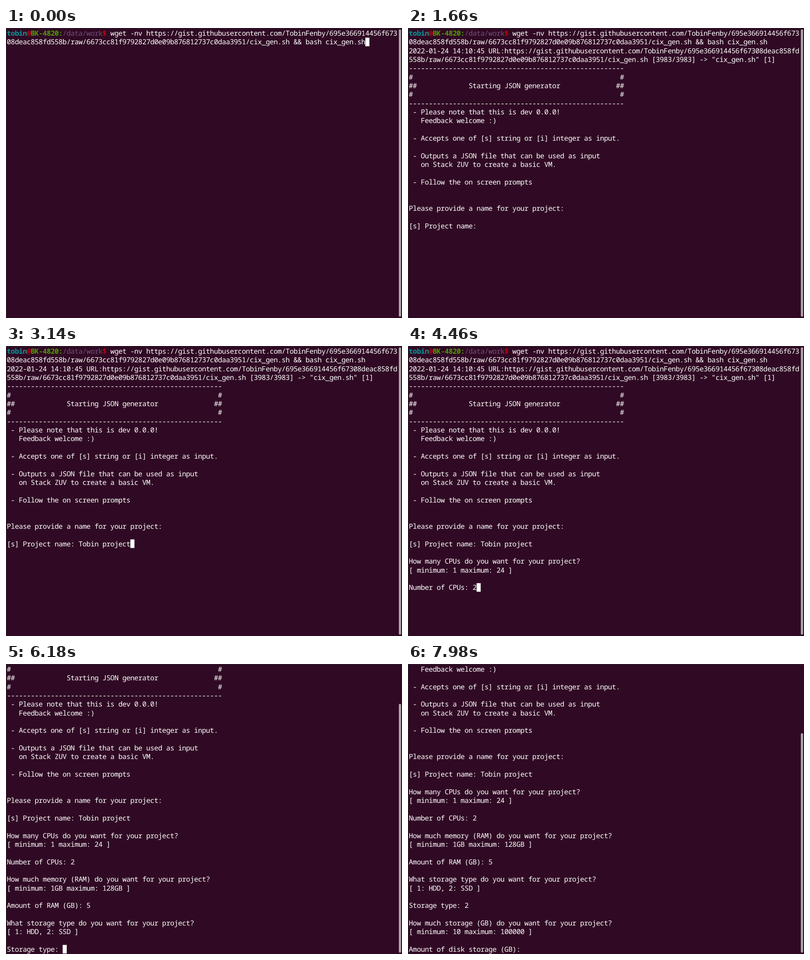
Animation, 874 px wide and 641 px high, one loop 8 s. Source, as an HTML page:

```html
<!DOCTYPE html>
<html lang="en">
<head>
<meta charset="utf-8">
<title>Terminal session</title>
<style>
  :root { --cell: 8.79px; --row: 19.34px; }
  html, body { margin: 0; width: 100%; height: 100%; overflow: hidden; background: #300a24; }
  #stage {
    position: absolute; left: 0; top: 0; width: 874px; height: 641px; overflow: hidden;
    background: #300a24; color: #fff;
    font: 15.5px/var(--row) "Noto Sans Mono", "DejaVu Sans Mono", monospace;
    letter-spacing: calc(var(--cell) - 1ch);
    text-rendering: geometricPrecision;
    font-variant-ligatures: none;
  }
  #stage::before {
    content: ""; position: absolute; inset: 0;
    border: solid #262626; border-width: 1px 0 0 1px;
  }
  pre { position: absolute; left: 1.8px; top: 2px; margin: 0; font: inherit; }
  b.user { color: #06989a; }
  b.sign { color: #cc0000; }
  b.host { color: #4e9a06; }
  .path { color: #75507b; }
  #cursor {
    position: absolute; left: 1.8px; top: 2px;
    width: var(--cell); height: var(--row); background: #fff;
  }
  #bar {
    position: absolute; left: 867px; width: 5px; bottom: 3px;
    border-radius: 3px; background: #aea4aa;
  }
</style>
</head>
<body>
<div id="stage">
  <pre id="prompt"><b class="user">tobin</b><b class="sign">@</b><b class="host">BK-4820:</b><span class="path">/data/work</span><b class="sign">$</b></pre>
  <pre id="screen"></pre>
  <div id="cursor"></div>
  <div id="bar"></div>
</div>
<script>
const LOOP = 8000, COLS = 98, ROWS = 33, CELL = 8.79, ROW = 19.34;
const $ = id => document.getElementById(id);
const gap = n => ' '.repeat(n);

const url = 'https://gist.githubusercontent.com/TobinFenby/695e366914456f67308deac858fd558b' +
  '/raw/6673cc81f9792827d0e09b876812737c0daa3951/cix_gen.sh';
const rule = '-'.repeat(54);
const edge = '#' + gap(52) + '#';

const intro = `2022-01-24 14:10:45 URL:${url} [3983/3983] -> "cix_gen.sh" [1]
${rule}
${edge}
##${gap(13)}Starting JSON generator${gap(14)}##
${edge}
${rule}
 - Please note that this is dev 0.0.0!
   Feedback welcome :)

 - Accepts one of [s] string or [i] integer as input.

 - Outputs a JSON file that can be used as input
   on Stack ZUV to create a basic VM.

 - Follow the on screen prompts


Please provide a name for your project:

[s] Project name: `;

const ask = (question, range, label) =>
  `\n${question} do you want for your project?\n[ ${range} ]\n\n${label}: `;

// Each step: time, printed text, cursor shown
const steps = [];
const print = (time, text) => steps.push([time, text, true]);
const blink = (time, on) => steps.push([time, '', on]);
const type = (text, ...times) => times.forEach((time, i) => print(time, text[i]));

print(0, `${gap(26)}wget -nv ${url} && bash cix_gen.sh`);
blink(240, false);
print(580, '\n');
print(800, intro);
blink(940, false);
blink(1300, true);
blink(1660, false);
type('Tobin p', 1760, 1840, 2040, 2100, 2180, 2260, 2340);
blink(2660, false);
type('roject', 2700, 2760, 2940, 3000, 3080, 3140);
blink(3480, false);
print(3540, '\n');
print(3580, ask('How many CPUs', 'minimum: 1 maximum: 24', 'Number of CPUs'));
blink(3920, false);
blink(4280, true);
print(4460, '2');
print(4740, '\n' + ask('How much memory (RAM)', 'minimum: 1GB maximum: 128GB', 'Amount of RAM (GB)'));
blink(5080, false);
blink(5460, true);
blink(5820, false);
print(5860, '5');
print(6160, '\n');
print(6180, ask('What storage type', '1: HDD, 2: SSD', 'Storage type'));
blink(6520, false);
blink(6880, true);
print(7180, '2');
blink(7520, false);
print(7600, '\n');
print(7640, ask('How much storage (GB)', 'minimum: 10 maximum: 100000', 'Amount of disk storage (GB)'));
blink(7980, false);

const wrap = text => text.split('\n')
  .flatMap(line => line.match(new RegExp(`.{1,${COLS}}`, 'g')) || ['']);

let shown = -1;

function show(index) {
  const lines = wrap(steps.slice(0, index + 1).map(step => step[1]).join(''));
  const scroll = Math.max(0, lines.length - ROWS);
  const row = lines.length - 1 - scroll;
  const column = lines[lines.length - 1].length;
  $('screen').textContent = lines.slice(scroll).join('\n');
  $('prompt').hidden = scroll > 0;
  $('prompt').style.display = scroll > 0 ? 'none' : '';
  $('cursor').style.transform = `translate(${column * CELL}px, ${row * ROW}px)`;
  $('cursor').style.visibility = steps[index][2] ? 'visible' : 'hidden';
  $('bar').style.top = `${3 + 643 * scroll / lines.length}px`;
}

function tick() {
  const time = performance.now() % LOOP;
  const index = steps.filter(step => step[0] <= time).length - 1;
  if (index !== shown) show(shown = index);
  requestAnimationFrame(tick);
}
tick();
</script>
</body>
</html>
```
